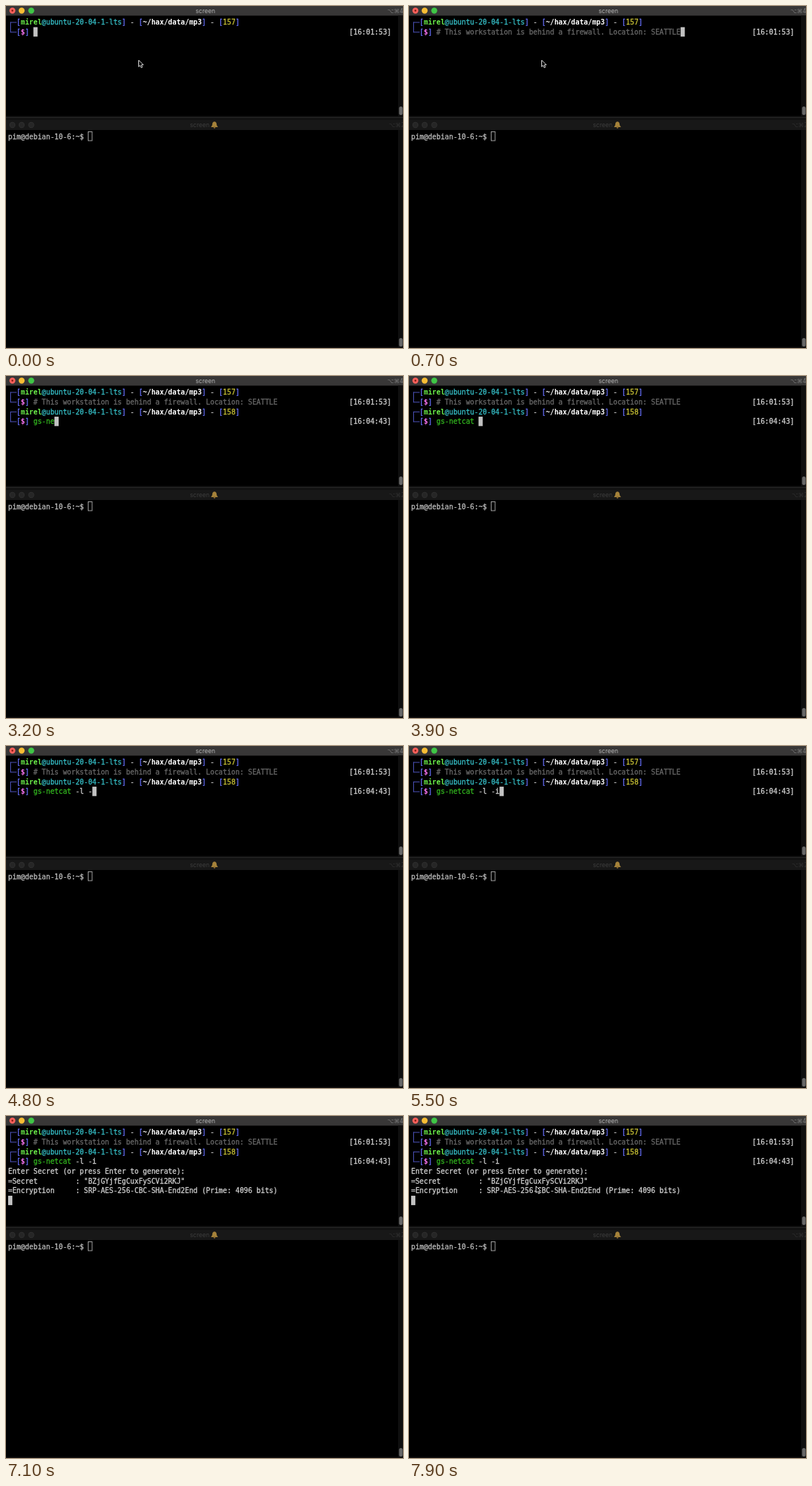
An HTML page with a canvas for the animation above (8 s loop, 558x480 px).

```html
<!DOCTYPE html>
<html lang="en">
<head>
<meta charset="utf-8">
<title>Terminal session</title>
<style>
  html, body { margin: 0; width: 100%; height: 100%; overflow: hidden; background: #000; }
  canvas { display: block; }
</style>
</head>
<body>
<canvas width="558" height="480"></canvas>
<script>
const ctx = document.querySelector('canvas').getContext('2d');
const LOOP = 8000, STEP = 100;
const SIZE = 9.83, CELL = SIZE * 0.602, LINE = 13.7, LEFT = 3, TOP = 16;
const MONO = SIZE + 'px "DejaVu Sans Mono", monospace';
const UI = '8.6px "Inter", sans-serif', KEYS = '8px "DejaVu Sans", sans-serif';
const BLUE = '#6871ff', GREY = '#d0d0d0', GREEN = '#32b41e', DIM = '#686868';

const COMMENT = '# This workstation is behind a firewall. Location: SEATTLE';
const COMMAND = 'gs-netcat -l -i';
const ASK = 'Enter Secret (or press Enter to generate): ';

// [time, characters visible from then on]
const COMMENT_KEYS = [[100, 8], [200, 18], [500, 31], [600, 45], [700, 58]];
const COMMAND_KEYS = [[2600, 1], [2800, 2], [2900, 3], [3000, 4], [3200, 5], [3300, 6],
  [3400, 7], [3500, 8], [3600, 9], [3800, 10], [4100, 11], [4300, 12], [4600, 13],
  [4800, 14], [5000, 15]];
const NEW_PROMPT = 1500, RUN = 6500, RESULT = 7000, POINTER_BACK = 7800;

const colX = col => LEFT + col * CELL;
const rowY = row => TOP + row * LINE;
const typed = (keys, t) => keys.reduce((n, [at, count]) => t >= at ? count : n, 0);

function rect(x, y, w, h, color) {
  ctx.fillStyle = color;
  ctx.fillRect(x, y, w, h);
}

function circle(x, y, r, color) {
  ctx.fillStyle = color;
  ctx.beginPath();
  ctx.arc(x, y, r, 0, 7);
  ctx.fill();
}

function text(str, x, y, color, font) {
  ctx.font = font;
  ctx.fillStyle = color;
  ctx.fillText(str, x, y);
}

// Terminal text, slightly thickened like the smoothed type of a desktop terminal.
function mono(str, x, y, color, bold) {
  text(str, x, y, color, (bold ? 'bold ' : '') + MONO);
  if (bold) return;
  ctx.strokeStyle = color;
  ctx.lineWidth = 0.3;
  ctx.strokeText(str, x, y);
}

// Writes coloured runs one after another; a third item makes a run bold.
function write(row, col, ...runs) {
  for (const [str, color = GREY, bold] of runs) {
    mono(str, colX(col), rowY(row) + 10.2, color, bold);
    col += str.length;
  }
}

function block(row, col) {
  rect(colX(col), rowY(row), CELL, LINE - 0.5, '#c2c2c2');
}

function prompt(row, number, clock) {
  const y = rowY(row) + 6.5;
  rect(6, y, 1, LINE + 1, '#4c52b8');
  rect(6, y, 9, 1, '#4c52b8');
  rect(6, y + LINE, 9, 1, '#4c52b8');
  write(row, 2, ['[', BLUE], ['mirel', '#6cf04a', true], ['@', '#35bcc4'],
    ['ubuntu-20-04-1-lts', '#35bcc4'], [']', BLUE], [' - '], ['[', BLUE],
    ['~/hax/data/mp3', '#fff', true], [']', BLUE], [' - '], ['[', BLUE],
    [number, '#c7c035'], [']', BLUE]);
  write(row + 1, 2, ['[', BLUE], ['$', '#f773f2', true], [']', BLUE]);
  write(row + 1, 81, ['[' + clock + ']']);
}

function bell(x, y) {
  ctx.fillStyle = '#a5823a';
  ctx.beginPath();
  ctx.moveTo(x - 5, y + 3);
  ctx.quadraticCurveTo(x - 3, y + 1, x - 3, y - 1);
  ctx.bezierCurveTo(x - 3, y - 6, x + 3, y - 6, x + 3, y - 1);
  ctx.quadraticCurveTo(x + 3, y + 1, x + 5, y + 3);
  ctx.fill();
  circle(x, y + 3.6, 1.3, '#84642a');
}

function scrollbar(top, bottom, thumb) {
  rect(551, top, 7, bottom - top, '#0f0f0f');
  ctx.fillStyle = '#686868';
  ctx.beginPath();
  ctx.roundRect(552.5, thumb, 5, 12, 2.5);
  ctx.fill();
}

function windows() {
  rect(0, 0, 558, 480, '#000');
  rect(0, 0, 558, 13.5, '#383737');
  circle(9, 6.5, 4.2, '#f9605a');
  circle(9, 6.5, 1.3, '#7d1712');
  circle(22, 6.5, 4.2, '#f7bd34');
  circle(35.5, 6.5, 4.2, '#3fc646');
  text('screen', 266.5, 9.7, '#b4b4b4', UI);
  text('⌥⌘4', 536, 9.5, '#777', KEYS);
  scrollbar(13.5, 155, 141);

  rect(0, 154.5, 558, 5.5, '#121212');
  rect(0, 156, 558, 1, '#262626');
  rect(0, 160, 558, 14, '#181818');
  for (const x of [9, 22, 35.5]) {
    circle(x, 167, 4.2, '#303030');
    circle(x, 167, 3.2, '#262626');
  }
  text('screen', 258.5, 170.2, '#3e3e3e', UI);
  bell(293, 167);
  text('⌥⌘2', 538, 170, '#303030', KEYS);
  scrollbar(174, 480, 466);
  rect(0, 478.5, 551, 1.5, '#121010');

  mono('pim@debian-10-6:~$', LEFT, 186.5, '#bcbcbc');
  ctx.strokeStyle = '#a0a0a0';
  ctx.lineWidth = 1;
  ctx.strokeRect(115.5, 176.5, 5.5, 12.5);
}

function pointer(x, y) {
  ctx.beginPath();
  for (const [dx, dy] of [[0, 0], [0, 9.2], [2.1, 7.3], [3.6, 10.6], [5.2, 9.9], [3.8, 6.7], [6.6, 6.6]])
    ctx.lineTo(x + dx, y + dy);
  ctx.closePath();
  ctx.fillStyle = '#000';
  ctx.fill();
  ctx.strokeStyle = '#e0e0e0';
  ctx.lineWidth = 1;
  ctx.stroke();
}

function session(t) {
  const comment = COMMENT.slice(0, typed(COMMENT_KEYS, t));
  prompt(0, '157', '16:01:53');
  write(1, 6, [comment, DIM]);
  if (t < NEW_PROMPT) return block(1, 6 + comment.length);

  const command = COMMAND.slice(0, typed(COMMAND_KEYS, t));
  prompt(2, '158', '16:04:43');
  write(3, 6, [command.slice(0, 9), GREEN], [command.slice(9)]);
  if (t < RUN) return block(3, 6 + command.length);

  write(4, 0, [ASK]);
  if (t < RESULT) return block(4, ASK.length);

  write(5, 0, ['=Secret'.padEnd(16) + ': "BZjGYjfEgCuxFySCVi2RKJ"']);
  write(6, 0, ['=Encryption'.padEnd(16) + ': SRP-AES-256-CBC-SHA-End2End (Prime: 4096 bits)']);
  block(7, 0);
}

function draw(now) {
  const t = Math.floor(now % LOOP / STEP) * STEP;
  windows();
  session(t);
  if (t < NEW_PROMPT) pointer(186.5, 76);
  else if (t >= POINTER_BACK + STEP) pointer(178.5, 98.5);
  else if (t >= POINTER_BACK) pointer(183, 87);
  requestAnimationFrame(draw);
}
requestAnimationFrame(draw);
</script>
</body>
</html>
```
